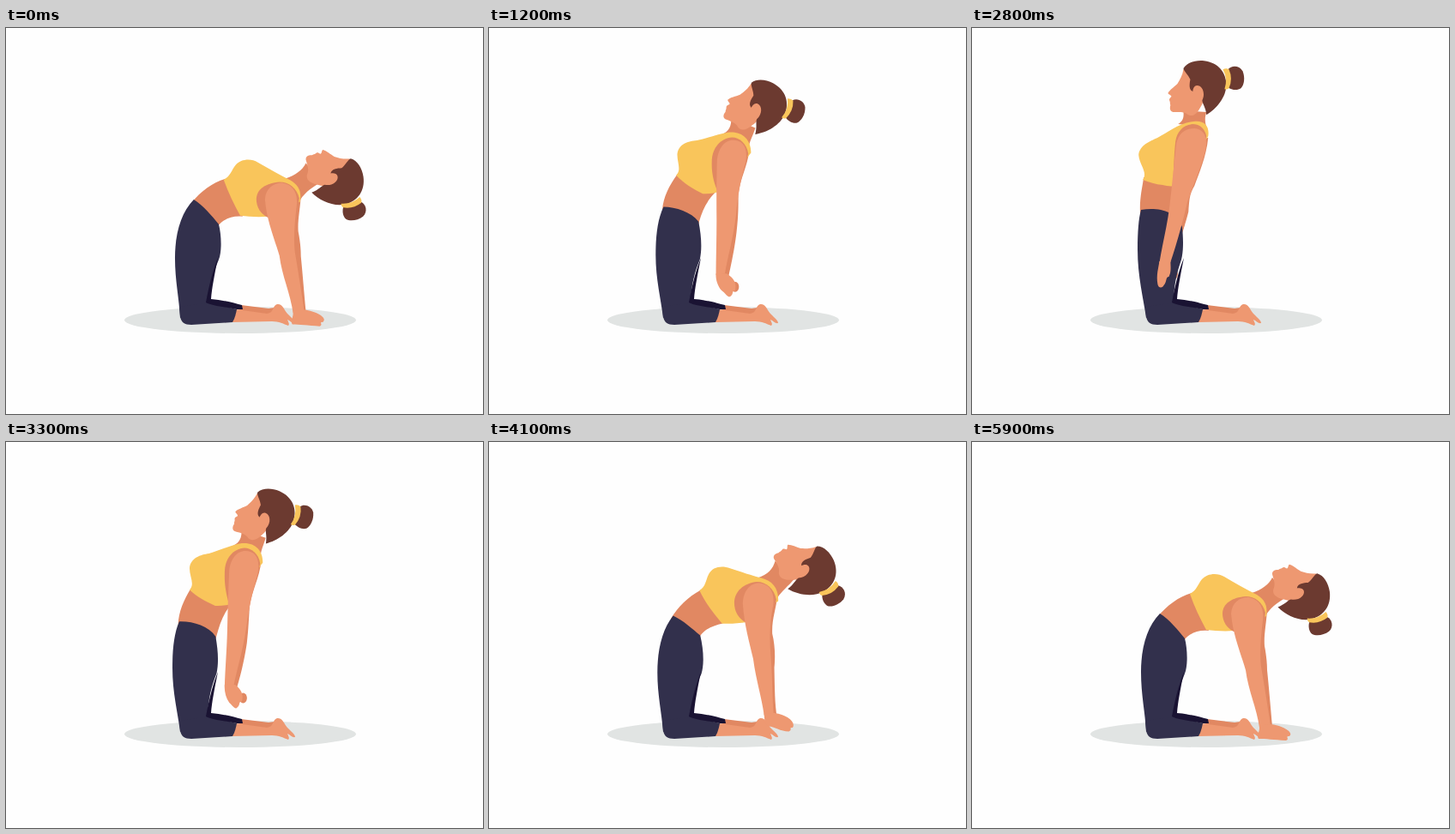
Animation of 556 by 450 pixels, one loop 6000 ms. Source, as an HTML page:

```html
<!DOCTYPE html>
<html lang="en">
<head>
<meta charset="utf-8">
<title>Camel pose</title>
<style>
  html, body { margin: 0; width: 100%; height: 100%; overflow: hidden; background: #fefefe; }
  svg { display: block; width: 556px; height: 450px; }
  .skin { fill: #ee9871; }
  .shade { fill: #e18862; }
  .navy { fill: #32304c; }
  .dark { fill: #1a1333; }
  .top { fill: #f9c55b; }
  .hair { fill: #6c3a30; }
</style>
</head>
<body>
<svg viewBox="0 0 556 450">
  <ellipse cx="273" cy="340.5" rx="135" ry="15.5" fill="#e1e4e3"/>
  <path class="shade" d="M274,323 L306,327 L313,326 L322,338 L270,332Z"/>
  <ellipse id="farHand" class="shade" rx="4.5" ry="6"/>
  <path id="farArm" class="shade"/>
  <path class="skin" d="M268,328 L304,333 C313,332 310,324 316,322 C322,321 324,328 328,333 C333,338 337,341 337,344 C334,345 331,341 328,340 C329,343 331,345 329,347 C324,345 318,342 310,342 L263,343Z"/>
  <path id="waist" class="shade"/>
  <path id="thigh" class="navy"/>
  <path class="navy" d="M202,325 L203,336 C204,343 208,346 216,346 L264,343 C267,338 268,333 269,328 L236,320Z"/>
  <path class="dark" d="M247,268 C243,288 240,303 239,316 C252,317 264,320 275,323 L276,328 L269,328 C255,325 240,324 233,320 C236,305 239,288 247,268Z"/>
  <path id="neck" class="shade"/>
  <g id="head">
    <path class="skin" d="M246,48 C245,55 242,60 239,65 C235,69 230,72 228,76 C229,78 232,78 232,80 C230,82 229,83 230,85 C231,87 230,88 231,90 C230,93 230,97 234,98 C240,98 246,97 250,100 C256,105 262,100 266,92 C270,86 272,78 268,66 L258,55Z"/>
    <path class="hair" d="M246,47 C250,40 260,37 270,38 C287,40 296,52 296,66 C296,80 285,94 273,101 C272,92 268,88 268,84 C272,76 268,67 262,67 C258,67 257,72 257,74 C252,72 253,65 254,60 C252,55 246,50 246,47Z"/>
    <path class="hair" d="M298,48 C302,43 311,43 315,50 C318,57 317,66 313,70 C309,73 302,72 298,69Z"/>
    <path class="top" d="M292,48 Q296,46 299,48 Q304,59 299,70 Q297,72 294,71 Q298,59 292,48Z"/>
  </g>
  <path id="bra" class="top"/>
  <path id="shoulder" class="shade"/>
  <path id="arm" class="skin"/>
  <path id="hand" class="skin"/>
</svg>
<script>
// Each part has three poses: bent back, halfway, upright.
const STOPS = [0, 0.39, 0.98];
const parts = {
  farArm: [
    'M322,190 L344,196 C343,212 340,225 341,238 C343,248 344,258 344,266 C346,285 348,310 350,332 L338,332 L325,262Z',
    'M306,160 L325,162 C323,180 316,190 316,210 C319,225 319,240 317,256 C316,280 314,300 316,308 L305,308 L300,240Z',
    'M250,130 L275,128 C273,150 264,170 259,184 C253,194 253,200 252,214 C248,230 240,255 232,271 L226,270 L236,210Z'],
  waist: [
    'M216,204 C228,190 240,181 256,176 L276,220 C264,219 255,222 248,230 L244,238Z',
    'M208,208 C213,194 222,182 237,170 L269,203 C257,209 249,216 245,224 L243,232Z',
    'M196,216 C195,200 198,188 200,174 L258,182 C251,196 252,212 247,232 L244,240Z'],
  thigh: [
    'M219,200 C204,215 197,240 197,268 C197,295 202,316 203,338 L235,322 C237,300 242,285 248,270 C252,260 251,240 248,229 C240,219 230,207 219,200Z',
    'M210,205 C199,222 195.5,245 195.5,268 C195.5,295 201,316 203,338 L235,322 C236,300 241,283 247,270 C250,258 249,242 245,224 C236,217 222,208 210,205Z',
    'M197,212 C194,222 193,240 193,258 C193,290 200,316 203,338 L235,322 C235,300 239,285 244,270 C247,258 246,242 245,232 C238,212 215,209 197,212Z'],
  neck: [
    'M326,176 C338,172 346,166 350,158 L368,180 C358,186 350,191 343,201Z',
    'M298,142 C308,139 313,132 314,122 L340,140 C335,150 329,155 325,163Z',
    'M240,112 C246,108 247,104 246,96 L273,98 C271,104 271,108 273,116Z'],
  bra: [
    'M254,177 C262,173 263,166 268,160 C274,153 286,152 294,157 C306,164 320,172 332,178 C341,184 345,190 343,203 L305,220 C294,221 283,220 273,219 C266,206 259,192 254,177Z',
    'M235,171 C242,166 240,158 242,150 C245,139 256,137 266,139 C278,140 292,141 302,141 C317,142 327,152 327,168 L291,201 C282,203 274,204 266,204 C254,194 243,184 235,171Z',
    'M199,177 C205,168 195,160 194,148 C195,137 207,132 216,128 C228,122 240,111 258,109 C270,107 277,114 275,126 L236,184 C232,185 226,184 222,183 C214,182 206,180 199,177Z'],
  shoulder: [
    'M342,199 C339,187 330,180 319,180 C304,181 292,188 292,200 C292,209 297,217 305,221 L340,215Z',
    'M324,168 C322,155 312,147 303,147 C288,148 277,160 277,174 C277,186 281,194 289,201 L320,185Z',
    'M273,126 C271,116 264,112 257,112 C246,113 239,120 237,132 C235,150 235,165 234,184 L262,165Z'],
  arm: [
    'M302,200 C303,187 312,181 322,181 C334,183 341,192 339,208 C337,225 335,245 337,262 C341,285 345,310 348,331 L335,333 C332,310 322,290 319,266 C313,245 304,225 302,200Z',
    'M286,176 C286,160 294,149 304,149 C316,149 323,158 320,176 C316,190 314,212 315,236 C315,262 311,284 311,303 L301,305 C299,285 295,262 293,240 C290,220 287,200 286,176Z',
    'M238,134 C241,122 249,117 259,117 C270,118 275,127 272,142 C268,160 258,182 251,202 C245,228 238,252 231,273 L218,274 C221,254 227,232 230,208 C233,184 235,158 238,134Z'],
  hand: [
    'M335,330 C336,338 331,342 334,346 C342,346 352,347 366,348 C371,346 364,343 370,343 C376,338 360,330 348,329Z',
    'M301,303 C301,310 304,317 309,319 C315,320 320,328 326,327 C331,324 326,322 331,322 C334,314 326,306 313,303Z',
    'M218,272 C217,280 214,288 216,299 C217,304 222,303 223,300 C227,296 225,290 229,290 C232,284 231,279 231,272Z']
};

const el = id => document.getElementById(id);
const NUM = /[\d.]+/g;
const shapes = Object.entries(parts).map(([id, poses]) => ({
  node: el(id),
  shape: poses[0],
  values: poses.map(p => p.match(NUM).map(Number))
}));

// Quadratic through the three poses.
function weights(u) {
  return STOPS.map((s, i) => STOPS.reduce((w, r, j) => i === j ? w : w * (u - r) / (s - r), 1));
}

function draw(u) {
  const w = weights(u);
  const mix = (a, b, c) => a * w[0] + b * w[1] + c * w[2];
  for (const { node, shape, values: [a, b, c] } of shapes) {
    let i = 0;
    node.setAttribute('d', shape.replace(NUM, () => {
      const v = mix(a[i], b[i], c[i]);
      i++;
      return v.toFixed(2);
    }));
  }
  const x = mix(381, 348, 262), y = mix(175, 123, 73);
  el('head').setAttribute('transform', `translate(${x} ${y}) rotate(${mix(76, 45, 0)}) translate(-262 -73)`);
  el('farHand').setAttribute('cx', mix(352, 324, 235));
  el('farHand').setAttribute('cy', mix(338, 317, 287));
}

// Rise for 2100 ms, hold upright, return the same way, then rest.
const LOOP = 6000, STEP = 100, RISE = 2100, MIDDLE = 2300;
function progress(t) {
  const early = t >= 5900 ? t - LOOP : t;
  const s = (MIDDLE + 100 - Math.abs(early - MIDDLE)) / RISE;
  return (1 - Math.cos(Math.PI * Math.min(1, Math.max(0, s)))) / 2;
}

const start = performance.now();
function tick() {
  const t = (performance.now() - start) % LOOP;
  draw(progress(Math.floor((t + 4) / STEP) * STEP % LOOP));
  requestAnimationFrame(tick);
}
tick();
</script>
</body>
</html>
```
